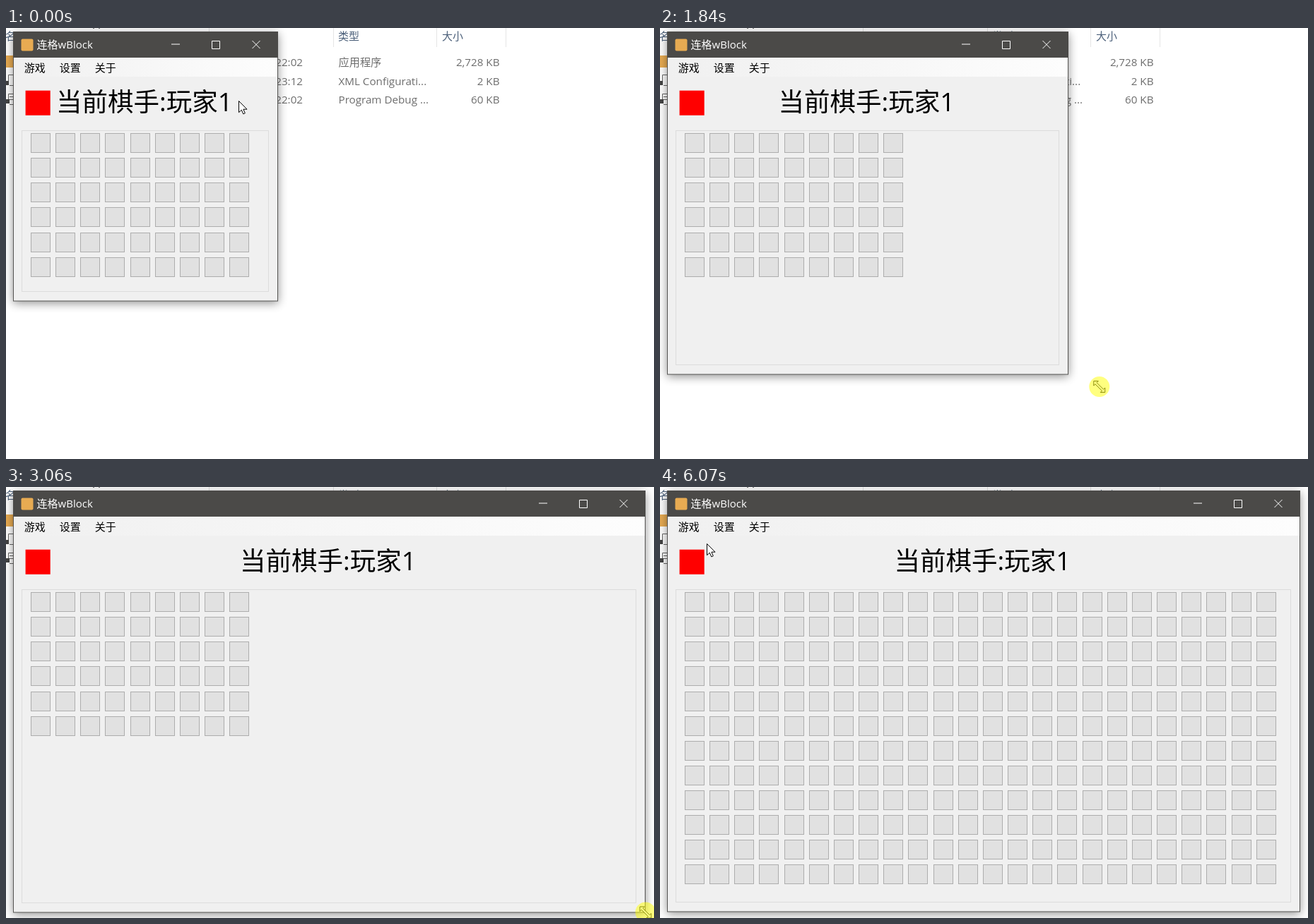
These frames come from a looping animation (917x611 px, 6530 ms). An HTML page:

```html
<!DOCTYPE html>
<html lang="zh">
<head>
<meta charset="utf-8">
<style>
html, body { margin: 0; width: 100%; height: 100%; overflow: hidden; background: #fff; }
svg { display: block; width: 917px; height: 611px; font: 15px "Open Sans", "Noto Sans CJK SC", "Noto Sans CJK", sans-serif; }
.row { fill: #6d6d6d; font-size: 15.2px; }
.head { fill: #4c607a; }
.end { text-anchor: end; }
.cell { fill: #e1e1e1; stroke: #adadad; }
.hot { fill: #b3d7f3; stroke: #0078d7; }
.logo { fill: #e8ab52; }
</style>
</head>
<body>
<svg viewBox="0 0 917 611">
  <defs>
    <linearGradient id="bar"><stop offset="0" stop-color="#f0f0f0"/><stop offset="1" stop-color="#fdfdfd"/></linearGradient>
    <filter id="blur" filterUnits="userSpaceOnUse" x="-30" y="-30" width="1000" height="700"><feGaussianBlur stdDeviation="7"/></filter>
  </defs>

  <path d="M287.5 0V27M463.5 0V27M609.5 0V27M707.5 0V27" stroke="#e5e5e5"/>
  <path d="M124 0v1M132 0v1" stroke="#777" stroke-width="2"/>
  <g class="head">
    <text x="-1" y="16.5">名</text><text x="470" y="16.5">类型</text><text x="617" y="16.5">大小</text>
  </g>
  <g id="files" class="row"></g>
  <rect class="logo" x="-7" y="39" width="17" height="17"/>
  <path d="M3.5 76V66.5H10M5 81.5H10M3.5 102V93.5H10M5 97.5H10M5 101.5H10M5 108.5H10" fill="none" stroke="#666"/>
  <path d="M0 78H4M0 104H5" stroke="#444" stroke-width="6"/>

  <rect id="shadow" x="10" y="8" filter="url(#blur)" opacity=".44"/>
  <rect id="body" x="10.5" y="5.5" fill="#f0f0f0" stroke="#555452"/>
  <rect id="title" x="10" y="5" height="37" fill="#4b4a48"/>
  <rect id="menu" x="11" y="42" height="27" fill="url(#bar)"/>
  <rect class="logo" x="21.5" y="15.5" width="17" height="17" rx="2"/>
  <text x="43.5" y="29" fill="#fff">连格wBlock</text>
  <path id="buttons" d="M-151 23h12M-93.5 18.5h11v11h-11zM-36.5 18l11 11M-25.5 18l-11 11" fill="none" stroke="#fff"/>
  <rect x="27.6" y="88.7" width="35.1" height="35.1" fill="#f00"/>
  <text id="turn" y="118.2" font-size="36.5" text-anchor="middle">当前棋手:玩家1</text>
  <rect id="frame" x="22.5" y="145.5" fill="none" stroke="#dcdcdc"/>
  <g id="board"></g>

  <rect id="hover" class="hot" x="16.5" y="44.5" width="49" height="22"/>
  <g id="drop">
    <rect x="20" y="70" width="121" height="73" opacity=".16"/>
    <rect x="17.5" y="66.5" width="120" height="73" fill="#fdfdfd" stroke="#808080"/>
    <path d="M17.5 67V44.5H65.5V67" fill="#fdfdfd" stroke="#808080"/>
    <rect x="19" y="68" width="29" height="70" fill="#f3f3f3"/>
    <rect id="item" class="hot" x="19.5" y="69.5" width="116" height="22"/>
    <g id="items"></g>
  </g>
  <g id="labels"></g>

  <g id="cursor">
    <path id="arrow" d="M0 0V16.2L3.8 12.7L6.3 18.4L8.8 17.3L6.4 11.7H11.5Z" fill="#fff" stroke="#000"/>
    <path id="resize" d="M-8-8H-1.5L-3.7-5.8L5.8 3.7L8 1.5V8H1.5L3.7 5.8L-5.8-3.7L-8-1.5Z" fill="#fff" stroke="#000" stroke-width=".9"/>
    <circle id="press" r="14.5" fill="#ff0" opacity=".5"/>
  </g>
</svg>
<script>
const LOOP = 6530, COLS = 24, ROWS = 12;
const $ = id => document.getElementById(id);
const assign = (el, attrs) => { for (const k in attrs) el.setAttribute(k, attrs[k]); };
const set = (id, attrs) => assign($(id), attrs);
const show = (id, on) => set(id, { visibility: on ? "inherit" : "hidden" });
const within = (t, a, b) => t >= a && t < b;

function add(parent, tag, attrs, text = "") {
  const el = document.createElementNS("http://www.w3.org/2000/svg", tag);
  assign(el, attrs);
  el.textContent = text;
  $(parent).append(el);
  return el;
}

// Static lists
[["22:02", "应用程序", "2,728 KB"], ["23:12", "XML Configurati...", "2 KB"], ["22:02", "Program Debug ...", "60 KB"]]
  .forEach(([time, kind, size], i) => {
    const y = 54.4 + i * 26.4;
    add("files", "text", { x: 420, y, class: "end" }, time);
    add("files", "text", { x: 470.5, y }, kind);
    add("files", "text", { x: 698.5, y, class: "end" }, size);
  });
["游戏", "设置", "关于"].forEach((s, i) => add("labels", "text", { x: 25.8 + i * 50, y: 61.5 }, s));
["新游戏", "重新开始", "退出"].forEach((s, i) => add("items", "text", { x: 54, y: 86 + i * 23 }, s));

const cells = [];
for (let r = 0; r < ROWS; r++) for (let c = 0; c < COLS; c++) {
  const x = Math.round(35 + c * 35.16) + .5, y = Math.round(149 + r * 35.13) + .5;
  cells.push({ r, c, el: add("board", "rect", { class: "cell", x, y, width: 27, height: 27 }) });
}

// The pointer is sampled: each leg moves it in a number of held steps.
const linear = p => p;
const speedUp = p => p ** 4;
const settle = p => 1 - (1 - p) ** 1.2;
const brake = p => 1 - (1 - p) ** 2;
const track = [{ t: 0, x: 329.5, y: 103.5 }];

function leg(from, to, steps, x, y, ease = linear) {
  const a = track[track.length - 1];
  for (let i = 0; i < steps; i++) {
    const p = ease((i + 1) / steps);
    track.push({
      t: Math.floor(from + (to - from) * i / Math.max(1, steps - 1)),
      x: a.x + (x - a.x) * p,
      y: a.y + (y - a.y) * p
    });
  }
}
leg(140, 440, 5, 383, 365);
leg(590, 980, 6, 384.5, 389.5);
leg(1360, 1520, 3, 438.5, 434, speedUp);
leg(1600, 2150, 8, 763, 566, settle);
leg(2230, 2530, 5, 848, 591);
leg(2610, 2750, 3, 905, 603, brake);
leg(2990, 3060, 2, 905, 603);
leg(3300, 3460, 3, 940, 640, speedUp);
leg(3760, 3760, 1, 52, -18);
leg(3770, 4370, 9, 41.5, 48.5, settle);
leg(4450, 4750, 5, 50, 59.5);
leg(4990, 5130, 3, 66.5, 80.5);

// The window corner trails the pointer by one step while it is dragged.
function corner(t, i) {
  if (t < 1440) return { x: 385, y: 387 };
  if (t >= 3300) return { x: 906, y: 602 };
  return { x: Math.round(track[i - 1].x), y: Math.round(track[i - 1].y) };
}

function drawWindow({ x, y }) {
  set("shadow", { width: x - 10, height: y - 5 });
  set("body", { width: x - 11, height: y - 5.5 });
  set("title", { width: x - 10 });
  set("menu", { width: x - 12 });
  set("buttons", { transform: `translate(${x})` });
  set("turn", { x: 195.8 + (x - 385) / 2 });
  set("frame", { width: x - 36, height: y - 159 });
}

function drawBoard(t) {
  const full = t >= 5750;
  const rows = full ? 3 * Math.min(4, Math.floor((t - 5750) / 80)) : 6;
  const cols = full ? COLS : 9;
  for (const { el, r, c } of cells) el.style.display = r < rows && c < cols ? "" : "none";
}

function draw(t) {
  let i = track.length - 1;
  while (track[i].t > t) i--;
  const { x, y } = track[i];
  drawWindow(corner(t, i));
  drawBoard(t);

  show("hover", within(t, 3770, 4450) && y >= 44);
  show("drop", within(t, 4450, 5290));
  show("item", within(t, 4990, 5290));

  const sizing = within(t, 980, 3400);
  set("cursor", { transform: `translate(${x} ${y})` });
  show("arrow", !sizing);
  show("resize", sizing);
  show("press", within(t, 1210, 3300) || within(t, 5130, 5290));
}

const start = performance.now();
function tick() {
  draw((performance.now() - start) % LOOP);
  requestAnimationFrame(tick);
}
tick();
</script>
</body>
</html>
```
